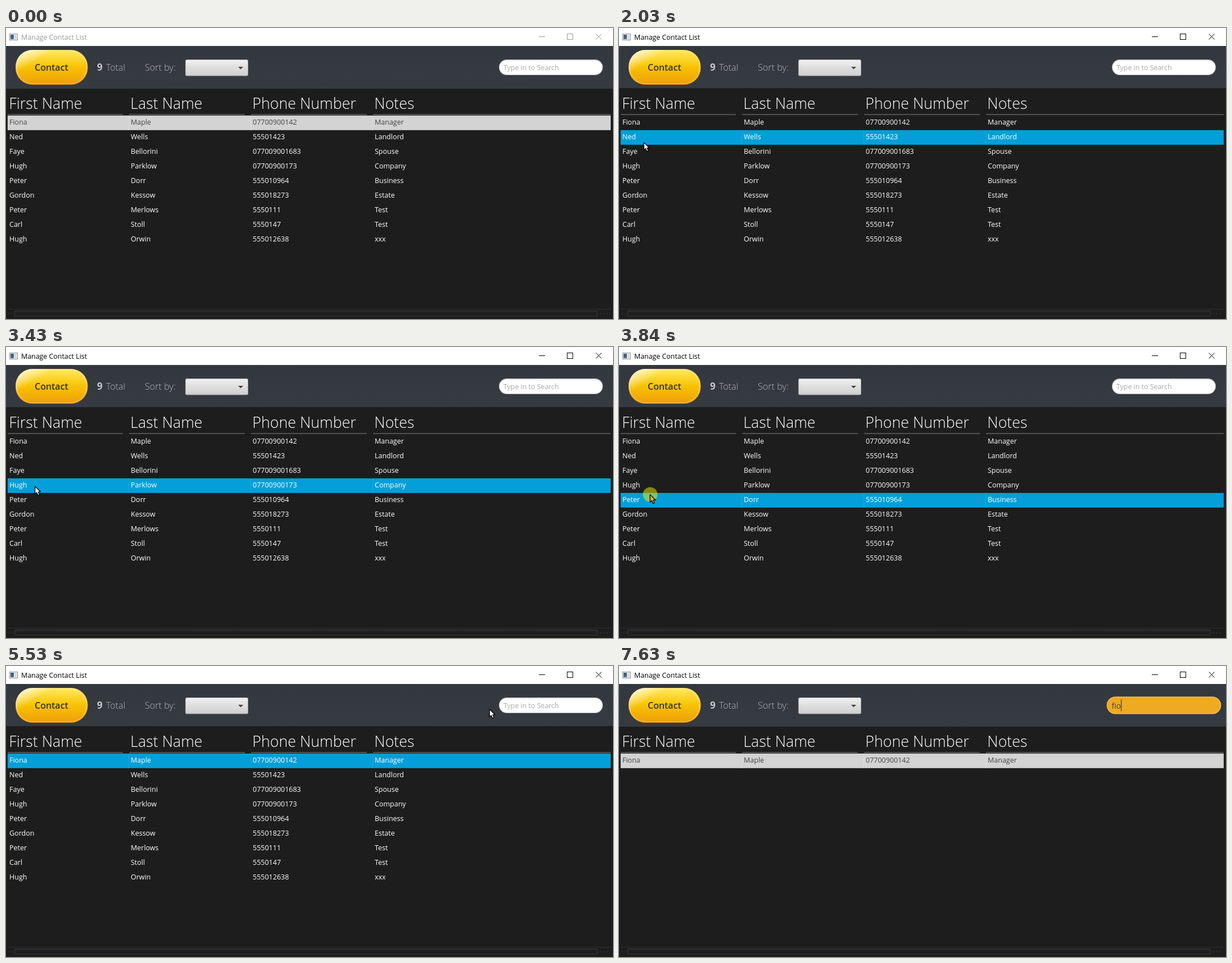
Animation, 1080 px wide and 518 px high, one loop 8 s. Source, as an HTML page with a canvas:

```html
<!DOCTYPE html>
<html lang="en">
<head>
<meta charset="utf-8">
<title>Manage Contact List</title>
<style>
html, body { margin: 0; width: 100%; height: 100%; overflow: hidden; background: #1d1d1d; }
canvas { display: block; }
</style>
</head>
<body>
<canvas id="stage" width="1080" height="518"></canvas>
<script>
const ctx = document.getElementById('stage').getContext('2d');
const LOOP = 8000;
const FONT = '"Open Sans", "Noto Sans", sans-serif';
const ROW_TOP = 156, ROW_HEIGHT = 26;

const columns = [
  { title: 'First Name', x: 3, end: 208 },
  { title: 'Last Name', x: 219, end: 425 },
  { title: 'Phone Number', x: 436, end: 642 },
  { title: 'Notes', x: 653, end: 1076 }
];
const contacts = [
  ['Fiona', 'Maple', '07700900142', 'Manager'],
  ['Ned', 'Wells', '55501423', 'Landlord'],
  ['Faye', 'Bellorini', '077009001683', 'Spouse'],
  ['Hugh', 'Parklow', '07700900173', 'Company'],
  ['Peter', 'Dorr', '555010964', 'Business'],
  ['Gordon', 'Kessow', '555018273', 'Estate'],
  ['Peter', 'Merlows', '5550111', 'Test'],
  ['Carl', 'Stoll', '5550147', 'Test'],
  ['Hugh', 'Orwin', '555012638', 'xxx']
];

// Pointer moves: first step, last step, step count, destination, sideways bow
const moves = [
  { from: 380, to: 1180, steps: 11, x: 95, y: 78 },
  { from: 1260, to: 1800, steps: 8, x: 44, y: 203 },
  { from: 2340, to: 2410, steps: 2, x: 48, y: 213 },
  { from: 2810, to: 3040, steps: 4, x: 49.5, y: 240 },
  { from: 3430, to: 3580, steps: 3, x: 55, y: 262 },
  { from: 4140, to: 4370, steps: 4, x: 54.5, y: 168, bow: 7 },
  { from: 5000, to: 5080, steps: 2, x: 846, y: 140 },
  { from: 5150, to: 5150, steps: 1, x: 612, y: 126 },
  { from: 5290, to: 5610, steps: 5, x: 922, y: 64 },
  { from: 5760, to: 5840, steps: 2, x: 925, y: 68 },
  { from: 6390, to: 6540, steps: 3, x: 594, y: 295 }
];
const clicks = [[1970, 2030], [2580, 2810], [3200, 3430], [3840, 3980], [4620, 4770], [6220, 6390]];
const selections = [[0, 0], [2030, 1], [2640, 2], [3200, 3], [3840, 4], [4620, 0]];
const typing = [[0, ''], [7010, 'f'], [7310, 'fi'], [7630, 'fio']];
const filters = [[0, ''], [7160, 'f'], [7480, 'fi']];
const ACTIVE_AT = 1970, TABLE_FOCUS_AT = 2030, SEARCH_FOCUS_AT = 6220;
const CARET_AT = 6930, POINTER_HIDES_AT = 7160;

const latest = (list, t) => list.filter(([at]) => t >= at).pop()[1];

function pointerAt(t) {
  let p = { x: 1021, y: 548 };
  for (const m of moves) {
    if (t < m.from) break;
    const gap = m.steps > 1 ? (m.to - m.from) / (m.steps - 1) : 1;
    const f = Math.min(m.steps, Math.floor((t - m.from) / gap + 1e-6) + 1) / m.steps;
    p = {
      x: p.x + (m.x - p.x) * f + (m.bow || 0) * Math.sin(Math.PI * f),
      y: p.y + (m.y - p.y) * f
    };
  }
  return p;
}

function rect(x, y, w, h, fill) {
  ctx.fillStyle = fill;
  ctx.fillRect(x, y, w, h);
}

function rounded(x, y, w, h, r, fill) {
  ctx.fillStyle = fill;
  ctx.beginPath();
  ctx.roundRect(x, y, w, h, r);
  ctx.fill();
}

function line(points, color, width = 1) {
  ctx.strokeStyle = color;
  ctx.lineWidth = width;
  ctx.beginPath();
  points.forEach(([x, y], i) => i ? ctx.lineTo(x, y) : ctx.moveTo(x, y));
  ctx.stroke();
}

function polygon(points, fill) {
  ctx.fillStyle = fill;
  ctx.beginPath();
  points.forEach(([x, y]) => ctx.lineTo(x, y));
  ctx.closePath();
  ctx.fill();
}

function text(str, x, y, size, color, weight = 400) {
  ctx.font = `${weight} ${size}px ${FONT}`;
  ctx.fillStyle = color;
  ctx.fillText(str, x, y);
}

function gradient(y0, y1, ...stops) {
  const g = ctx.createLinearGradient(0, y0, 0, y1);
  stops.forEach((c, i) => g.addColorStop(i / (stops.length - 1), c));
  return g;
}

function scaled(cx, cy, scale, draw) {
  ctx.save();
  ctx.translate(cx, cy);
  ctx.scale(scale, scale);
  ctx.translate(-cx, -cy);
  draw();
  ctx.restore();
}

function drawTitleBar(active) {
  const ink = active ? '#000' : '#999';
  rect(0, 0, 1080, 32, '#fff');
  rect(6, 10, 15, 12, '#8b8f94');
  rect(7, 11, 13, 10, '#f2f2f2');
  rect(8, 12, 6, 8, gradient(12, 20, '#3c5873', '#49718f'));
  rect(15, 12, 4, 8, '#d6d9dc');
  text('Manage Contact List', 27, 20.5, 12.4, ink);
  line([[948, 15.5], [959, 15.5]], ink);
  ctx.strokeStyle = ink;
  ctx.strokeRect(998.5, 10.5, 10, 10);
  line([[1049.5, 10.5], [1059.5, 20.5]], ink);
  line([[1059.5, 10.5], [1049.5, 20.5]], ink);
}

function drawContactButton(hover) {
  const x = 17, y = 39, w = 128.5, h = 62;
  const layers = [
    ['#ffd65b', '#e68400'],
    ['#ffef84', '#f2ba44'],
    ['#ffea6a', '#efaa22'],
    ['#ffe657', '#f8c202', '#eea10b']
  ];
  scaled(x + w / 2, y + h / 2, hover ? 1.1 : 1, () => {
    layers.forEach((stops, i) => {
      rounded(x + i, y + i, w - 2 * i, h - 2 * i, 30 - i, gradient(y + i, y + h - i, ...stops));
    });
    const gloss = ctx.createLinearGradient(x, y, x + w * 0.15, y + h * 0.5);
    gloss.addColorStop(0, 'rgba(255,255,255,.9)');
    gloss.addColorStop(1, 'rgba(255,255,255,0)');
    rounded(x, y, w, h, 30, gloss);
    text('Contact', 51, 76, 16, '#333', 600);
  });
}

function drawSearch(focused, query, caret) {
  scaled(969.5, 70, focused ? 1.1 : 1, () => {
    if (focused) {
      rounded(877, 56, 185, 28, 14, '#f8c645');
      rounded(878.3, 57.3, 182.4, 25.4, 12.7, '#efa922');
      text(query, 885, 75, 12.6, '#444');
      if (caret) rect(885 + ctx.measureText(query).width, 60.5, 1, 19, '#333');
    } else {
      rounded(877, 56, 185, 28, 14, '#aeb0b3');
      rounded(878, 57, 183, 26, 13, gradient(57, 61, '#eee', '#fff'));
      text('Type in to Search', 885, 75, 12.4, '#a9a9a9');
    }
  });
}

function drawToolbar(bottom, hover) {
  rect(0, 32, 1080, bottom - 32, gradient(32, bottom, '#33373e', '#363a41'));
  drawContactButton(hover);
  text('9', 162, 76, 17, '#c6c8cb', 700);
  text('Total', 178, 76, 16, '#b5b8bc', 300);
  text('Sort by:', 247, 76, 16.2, '#b5b8bc', 300);
  rounded(319, 56, 112, 29.5, 3, '#a5a6a8');
  rounded(320, 57, 110, 27.5, 2, gradient(57, 84, '#f0f0f0', '#dedede', '#d0d0d0'));
  polygon([[413, 69], [422, 69], [417.5, 73.5]], '#444');
}

function drawTable(selected, tableFocused, rows) {
  for (const c of columns) {
    text(c.title, c.x + 2.3, 144, 26.8, '#fff', 300);
    rect(c.x, 153.5, c.end - c.x, 1, '#858585');
  }
  rows.forEach((row, i) => {
    const y = ROW_TOP + i * ROW_HEIGHT;
    const chosen = row === contacts[selected];
    if (chosen) {
      rect(2.9, y - 0.2, 1073, ROW_HEIGHT, tableFocused ? '#049fd8' : '#d3d3d3');
      for (const c of columns.slice(1)) {
        rect(c.x - 1, y, 1, ROW_HEIGHT, tableFocused ? '#1ca8dc' : '#dedede');
      }
    }
    const ink = chosen && !tableFocused ? '#444' : '#fff';
    row.forEach((cell, k) => text(cell, columns[k].x + 3, y + 16, 12.5, ink));
  });
}

function drawScrollBar() {
  rect(2, 500, 1074, 1, '#303030');
  rounded(15, 503, 1037.5, 10, 2, '#3c3c3c');
  rounded(16, 504, 1035.5, 8, 1, gradient(504, 512, '#242424', '#191919'));
  for (let i = 0; i < 3; i++) {
    rect(4 + i * 4, 507, 2, 3, '#282828');
    rect(1056 + i * 6, 507, 3, 3, '#282828');
  }
}

function drawPointer({ x, y }, clicking) {
  const overSearch = x > 877 && x < 1062 && y > 56 && y < 84;
  if (clicking) {
    ctx.fillStyle = 'rgba(250,240,0,.5)';
    ctx.beginPath();
    ctx.arc(x + 0.5, y + 0.5, 13, 0, Math.PI * 2);
    ctx.fill();
  }
  if (overSearch) {
    const ink = clicking ? '#69620f' : '#333';
    rect(x - 0.5, y - 8, 2.5, 16, ink);
    rect(x - 4.5, y - 8, 10.5, 2.5, ink);
    rect(x - 4.5, y + 5.5, 10.5, 2.5, ink);
    return;
  }
  const arrow = [[0, 0], [0, 13.5], [3, 11], [5.2, 16], [7.8, 14.8], [5.8, 10], [9.6, 9.6]];
  const shape = arrow.map(([dx, dy]) => [x + dx + 0.3, y + dy + 0.6]);
  polygon(shape, clicking ? '#f0a848' : '#fff');
  line([...shape, shape[0]], '#000', 1.3);
}

function draw(t) {
  const pointer = pointerAt(t);
  const searchFocused = t >= SEARCH_FOCUS_AT;
  const tableFocused = t >= TABLE_FOCUS_AT && !searchFocused;
  const hover = t >= 380 && pointer.x > 17 && pointer.x < 145 && pointer.y > 39 && pointer.y < 101;
  const filter = latest(filters, t);
  const rows = contacts.filter(([first]) => first.toLowerCase().startsWith(filter));

  rect(0, 0, 1080, 518, '#1d1d1d');
  drawTitleBar(t >= ACTIVE_AT);
  drawToolbar(tableFocused ? 107 : 108, hover);
  drawSearch(searchFocused, latest(typing, t), t >= CARET_AT);
  drawTable(latest(selections, t), tableFocused, rows);
  drawScrollBar();
  if (t >= 380 && t < POINTER_HIDES_AT) {
    drawPointer(pointer, clicks.some(([down, up]) => t >= down && t < up));
  }
}

const start = performance.now();
function tick() {
  draw((performance.now() - start) % LOOP);
  requestAnimationFrame(tick);
}
tick();
</script>
</body>
</html>
```
